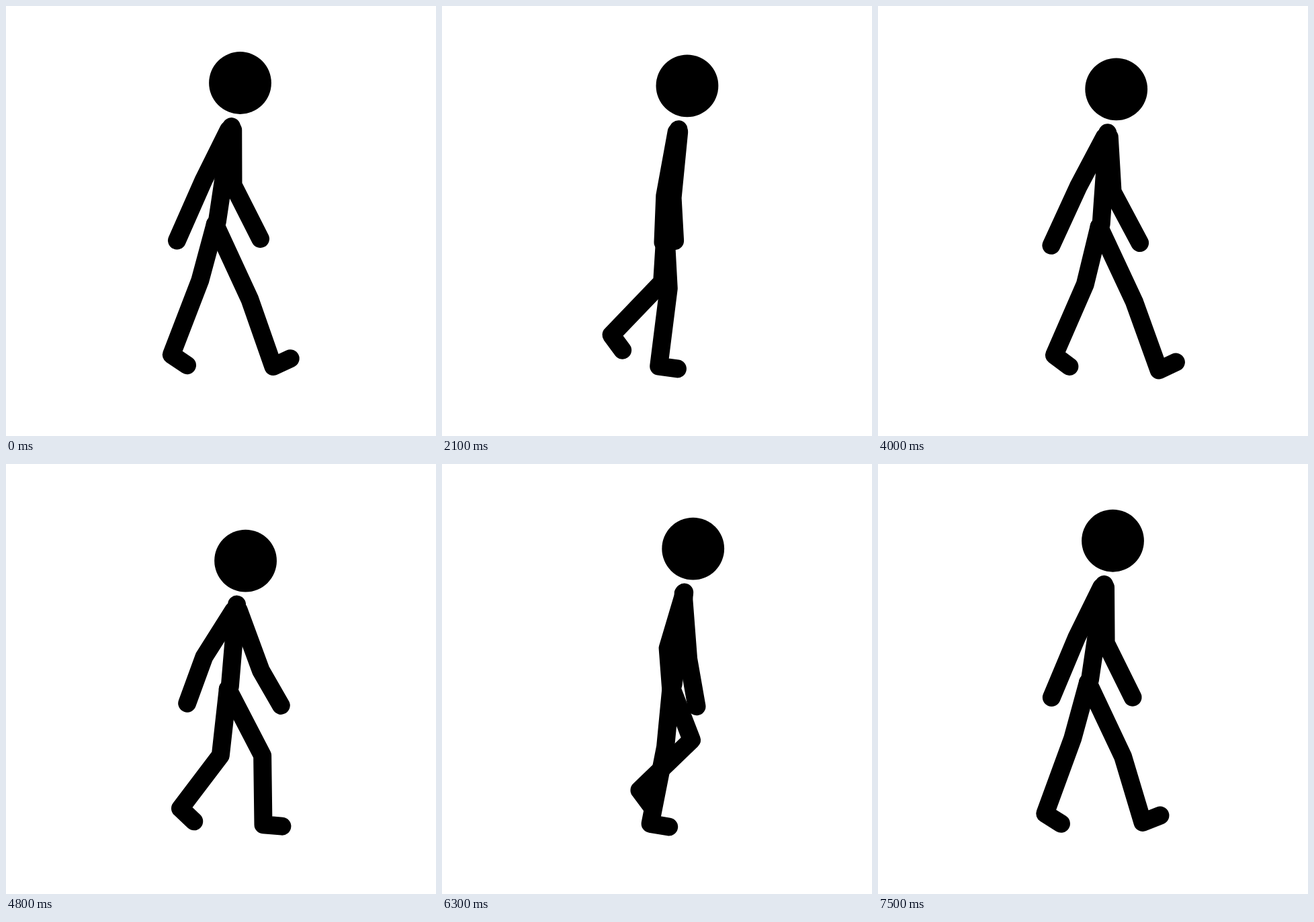
Write an HTML page with a canvas that moves like this. It is 640 px wide and 640 px high and loops after 7.6 s.

```html
<!DOCTYPE html>
<html lang="en">
<head>
<meta charset="utf-8">
<title>Walk cycle</title>
<style>
  html, body { margin: 0; height: 100%; overflow: hidden; background: #fff; }
  canvas { display: block; width: 640px; height: 640px; }
</style>
</head>
<body>
<canvas id="stage" width="640" height="640"></canvas>
<script>
const ctx = document.getElementById('stage').getContext('2d');
const STEP = 100, COUNT = 76; // ms per pose, poses per loop

// Smooth periodic curve through evenly spaced values; phase counts in loops.
const wave = (...values) => phase => {
  const n = values.length, at = i => values[(i + n) % n];
  const place = (phase - Math.floor(phase)) * n;
  const i = Math.floor(place), u = place - i, v = 1 - u;
  const slope = k => (at(k + 1) - at(k - 1)) / 2;
  return v * v * (1 + 2 * u) * at(i) + u * u * (3 - 2 * u) * at(i + 1) +
    u * v * (v * slope(i) - u * slope(i + 1));
};
const swing = (middle, size, peak, beats = 1) => phase =>
  middle + size * Math.cos(2 * Math.PI * beats * (phase - peak));
const path = (x, y) => phase => [x(phase), y(phase)];
const add = (a, b) => [a[0] + b[0], a[1] + b[1]];

const head = path(
  wave(348.5, 359, 364.5, 364, 355.5, 356, 374, 370),
  wave(114.5, 137.5, 121.5, 112, 119, 144, 128, 125));
const hip = path( // from the head
  swing(-31.5, -6, 0.05),
  wave(210.5, 198, 213, 214, 208, 191, 201, 208));

// One arm and one leg describe both sides, half a loop apart.
// The arm is measured from the head, knee and ankle from the hip.
const arm = [
  path(swing(-14, 4, 0.1), swing(70, 4, 0.125, 2)),
  path(
    wave(-10.5, 23, -14, -48, -54.5, -62, -43, 8),
    wave(152, 162.5, 172, 136, 145, 142.5, 162, 163)),
  path(
    wave(30, 54, -9, -46, -94, -88, -52, 32),
    wave(232, 215, 235, 204, 234.5, 212, 231, 235))
];
const knee = path(
  wave(51.5, 52.5, 12, -17, -22.5, -11, -16, 54),
  wave(111.5, 99.5, 87.5, 90, 83.5, 99, 79, 83));
const ankle = path(
  wave(86.5, 55, 1, -46, -65, -70, -90, -13),
  wave(211.5, 202, 203, 202.5, 194, 178.5, 159, 158));
const footTilt = wave(-25, 4, 7, 13, 34, 43, 53, 45); // degrees
const FOOT = 28;

function limb(...joints) {
  ctx.beginPath();
  joints.forEach(p => ctx.lineTo(...p));
  ctx.stroke();
}

function draw(phase) {
  ctx.fillStyle = '#fff';
  ctx.fillRect(0, 0, 640, 640);
  ctx.fillStyle = ctx.strokeStyle = '#000';
  ctx.lineWidth = 27;
  ctx.lineCap = ctx.lineJoin = 'round';

  const top = head(phase), pelvis = add(top, hip(phase));
  ctx.beginPath();
  ctx.arc(...top, 46.4, 0, 2 * Math.PI);
  ctx.fill();
  limb(add(top, [-13, 65]), add(pelvis, [3, -4]));

  for (const side of [phase, phase + 0.5]) {
    limb(...arm.map(joint => add(top, joint(side))));
    const heel = add(pelvis, ankle(side)), tilt = footTilt(side) * Math.PI / 180;
    const toe = add(heel, [FOOT * Math.cos(tilt), FOOT * Math.sin(tilt)]);
    limb(pelvis, add(pelvis, knee(side)), heel, toe);
  }
}

const start = performance.now();
function tick() {
  const pose = Math.floor((performance.now() - start) / STEP) % COUNT;
  draw(pose / COUNT);
  requestAnimationFrame(tick);
}
tick();
</script>
</body>
</html>
```
